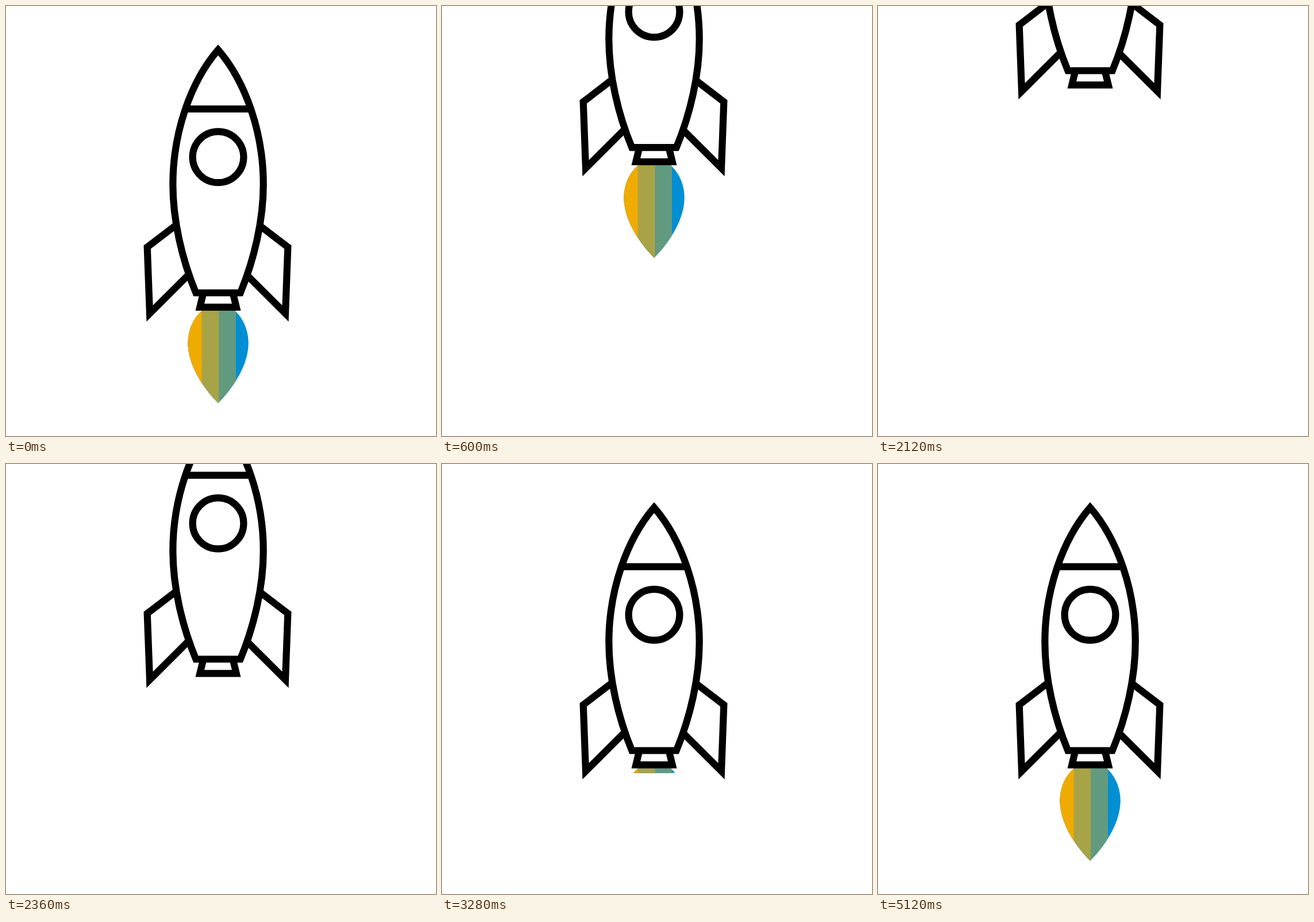
These frames come from a looping animation (748 px wide and 748 px high, 5.76 s). An HTML page:

```html
<!DOCTYPE html>
<html lang="en">
<head>
<meta charset="utf-8">
<title>Rocket</title>
<style>
  html, body { margin: 0; width: 100%; height: 100%; overflow: hidden; background: #fff; }
  svg { display: block; width: 100%; height: 100%; }
  .lines { fill: none; stroke: #000; stroke-width: 12.2; stroke-miterlimit: 10; }
</style>
</head>
<body>
<svg viewBox="0 0 748 748">
  <defs>
    <clipPath id="shape">
      <path d="M341 529.5C325 543 316.5 564 316.5 586C316.5 620 338 659 369 690.3C400 659 421.7 620 421.7 586C421.7 564 413 543 398 529.5Z"/>
    </clipPath>
    <clipPath id="reveal"><rect id="window" x="300" y="525" width="140" height="170"/></clipPath>
    <path id="fin" d="M294 382L245.7 419L250 534.3L316 468.5"/>
  </defs>
  <g id="rocket">
    <g id="flame" clip-path="url(#reveal)">
      <g clip-path="url(#shape)">
        <rect x="310" y="525" width="120" height="170" fill="#008fd3"/>
        <rect x="310" y="525" width="90" height="170" fill="#629a80"/>
        <rect x="310" y="525" width="60.4" height="170" fill="#a8a347"/>
        <rect x="310" y="525" width="30.6" height="170" fill="#f0ab00"/>
      </g>
    </g>
    <g class="lines">
      <path d="M369 75.7C321 131 290.3 220 290.3 310C290.3 372 306 440 330.3 498.5H407.7C432 440 447.7 372 447.7 310C447.7 220 417 131 369 75.7Z"/>
      <path d="M313 178.6H425"/>
      <circle cx="369" cy="262.3" r="44.4"/>
      <use href="#fin"/>
      <use href="#fin" transform="matrix(-1 0 0 1 736 0)"/>
      <path d="M342.5 502L337.3 523.3H400.7L395.5 502"/>
    </g>
  </g>
</svg>
<script>
  const LOOP = 5760, STEP = 40;
  const rocket = document.getElementById('rocket');
  const flame = document.getElementById('flame');
  const mask = document.getElementById('window');

  // Keys: time in ms, y offset in px, speed in px per ms
  const takeoff = [[0, 0.5, 0], [600, -252.3, -0.82], [1060, -691, -1.03], [1100, -732, -1.03]];
  const landing = [[1880, -609, 0.93], [2120, -386, 0.95], [2320, -192, 0.86], [2560, -40.3, 0.38], [2720, 0, 0.1]];

  function hermite(keys, t) {
    const i = keys.findIndex(k => k[0] > t);
    const [t0, y0, v0] = keys[i - 1], [t1, y1, v1] = keys[i];
    const d = t1 - t0, s = (t - t0) / d, r = 1 - s;
    return r * r * (1 + 2 * s) * y0 + s * s * (3 - 2 * s) * y1 + d * s * r * (r * v0 - s * v1);
  }

  function offset(t) {
    if (t < 1080) return hermite(takeoff, t);
    if (t < 1960) return -800;
    return t < 2720 ? hermite(landing, t) : 0;
  }

  // Lower edge of the flame while it is uncovered
  function flameEnd(t) {
    if (t < 1080) return 695;
    if (t < 3280) return 0;
    return Math.min(537.5 + (t - 3280) / 560 * 153.5, 695);
  }

  const start = performance.now();
  function draw() {
    const t = Math.floor((performance.now() - start) % LOOP / STEP) * STEP;
    const end = flameEnd(t);
    rocket.setAttribute('transform', `translate(0 ${offset(t).toFixed(2)})`);
    flame.setAttribute('visibility', end ? 'visible' : 'hidden');
    mask.setAttribute('height', Math.max(end - 525, 0));
    requestAnimationFrame(draw);
  }
  draw();
</script>
</body>
</html>
```
